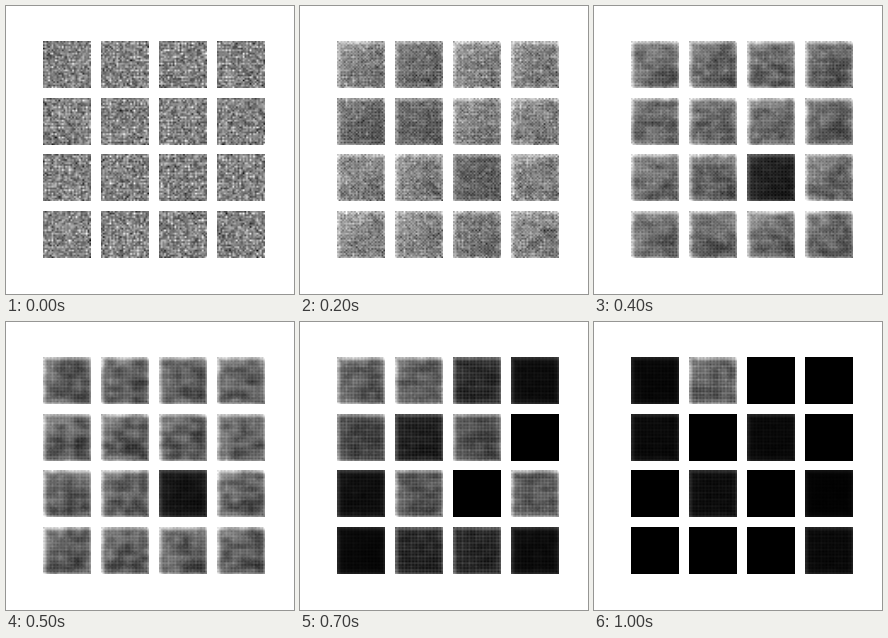
An HTML page with a canvas that plays this animation: 288 by 288 pixels, repeating every 1200 ms.

```html
<!DOCTYPE html>
<html lang="en">
<head>
<meta charset="utf-8">
<style>
html, body { margin: 0; width: 100%; height: 100%; overflow: hidden; background: #fff; }
canvas { display: block; }
</style>
</head>
<body>
<canvas id="stage" width="288" height="288"></canvas>
<script>
const N = 28, STEP_MS = 100, LOOP_MS = 1200, LAST = 10;
const TOPS = [35, 92, 148, 205];
const ctx = document.getElementById('stage').getContext('2d');
ctx.imageSmoothingQuality = 'low';
const cell = document.createElement('canvas');
cell.width = cell.height = N;
const cellCtx = cell.getContext('2d');
const pixels = cellCtx.createImageData(N, N);

const lerp = (a, b, t) => a + (b - a) * t;
const flat = (value, changes = {}) => Object.assign(Array(16).fill(value), changes);

// Training stages: texture strengths and the mean grey of each tile.
const stages = [
  { at: 0, noise: .28, check: 4, grid: 13, blotch: 0, slope: 0, edge: 0, mean: flat(132) },
  { at: 1, noise: .22, check: 20, grid: 10, blotch: .06, slope: .08, edge: 25,
    mean: flat(150, { 1: 112, 4: 100, 5: 85, 14: 130 }) },
  { at: 3, noise: .13, check: 18, grid: 11, blotch: .22, slope: .32, edge: 85, mean: flat(112, { 10: 45 }) },
  { at: 5, noise: .06, check: 4, grid: 11, blotch: .34, slope: .3, edge: 90, mean: flat(95, { 10: 22 }) },
  { at: 6, noise: .06, check: 3, grid: 13, blotch: .28, slope: .12, edge: 100,
    mean: [88, 75, 90, 13, 70, 52, 85, 0, 24, 92, 0, 97, 17, 78, 75, 7] },
  { at: 8, noise: .06, check: 3, grid: 14, blotch: .27, slope: .16, edge: 90,
    mean: [105, 115, 0, 14, 70, 14, 68, 0, 8, 75, 0, 84, 0, 0, 2, 20] },
  { at: 10, noise: .06, check: 3, grid: 16, blotch: .25, slope: .12, edge: 85,
    mean: [8, 95, 0, 0, 10, 0, 9, 0, 0, 14, 0, 3, 0, 0, 0, 10] }
];

function stageAt(step) {
  const i = Math.max(1, stages.findIndex(s => s.at >= step));
  const a = stages[i - 1], b = stages[i];
  const t = (step - a.at) / (b.at - a.at);
  const out = { mean: a.mean.map((m, k) => lerp(m, b.mean[k], t)) };
  for (const key of ['noise', 'check', 'grid', 'blotch', 'slope', 'edge']) out[key] = lerp(a[key], b[key], t);
  return out;
}

// Seeded generator (mulberry32).
function random(seed) {
  return () => {
    seed = seed + 0x6D2B79F5 | 0;
    let t = Math.imul(seed ^ seed >>> 15, 1 | seed);
    t = t + Math.imul(t ^ t >>> 7, 61 | t) ^ t;
    return ((t ^ t >>> 14) >>> 0) / 4294967296;
  };
}

function smoothField(rand) {
  const size = 9, knots = Array.from({ length: size * size }, () => rand() * 2 - 1);
  return (x, y) => {
    const u = x / 5, v = y / 3.6, i = Math.floor(u), j = Math.floor(v);
    const k = j * size + i;
    return lerp(lerp(knots[k], knots[k + 1], u - i),
                lerp(knots[k + size], knots[k + size + 1], u - i), v - j);
  };
}

function drawTile(step, tile, s) {
  const rand = random(step * 971 + tile * 7919 + 5);
  const blotch = smoothField(rand);
  const mean = s.mean[tile];
  const lattice = Math.min(1, mean / 40);
  const rim = s.edge * Math.min(1, Math.sqrt(mean / 90));
  for (let y = 0; y < N; y++) for (let x = 0; x < N; x++) {
    // Repeated upsampling leaves textures with periods of two and four cells.
    const gauss = (rand() + rand() + rand() - 1.5) * 2 * (x % 2 && y % 2 ? 1.5 : .8);
    const check = (x + y) % 2 ? 1 : -1;
    const grid = (x % 2 - .5) + (y % 2 - .5) + (x % 4 === 1 ? .5 : -.15) + (y % 4 === 1 ? .8 : -.25);
    const near = Math.exp(-Math.min(x, y) * .9) + .7 * Math.exp(-(N - 1 - Math.max(x, y)) * 1.1);
    const value = mean * (1 + s.noise * gauss + s.blotch * blotch(x, y) + s.slope * (1 - (x + y) / (N - 1)))
      + lattice * (s.check * check + s.grid * grid) + rim * near;
    const p = (y * N + x) * 4;
    pixels.data[p] = pixels.data[p + 1] = pixels.data[p + 2] = value;
    pixels.data[p + 3] = 255;
  }
  cellCtx.putImageData(pixels, 0, 0);
  ctx.drawImage(cell, 37 + 58 * (tile % 4), TOPS[tile >> 2], 48, 47);
}

let shown = -1;
function frame() {
  const step = Math.min(LAST, Math.floor(performance.now() % LOOP_MS / STEP_MS));
  if (step !== shown) {
    const s = stageAt(step);
    for (let tile = 0; tile < 16; tile++) drawTile(step, tile, s);
    shown = step;
  }
  requestAnimationFrame(frame);
}
frame();
</script>
</body>
</html>
```
